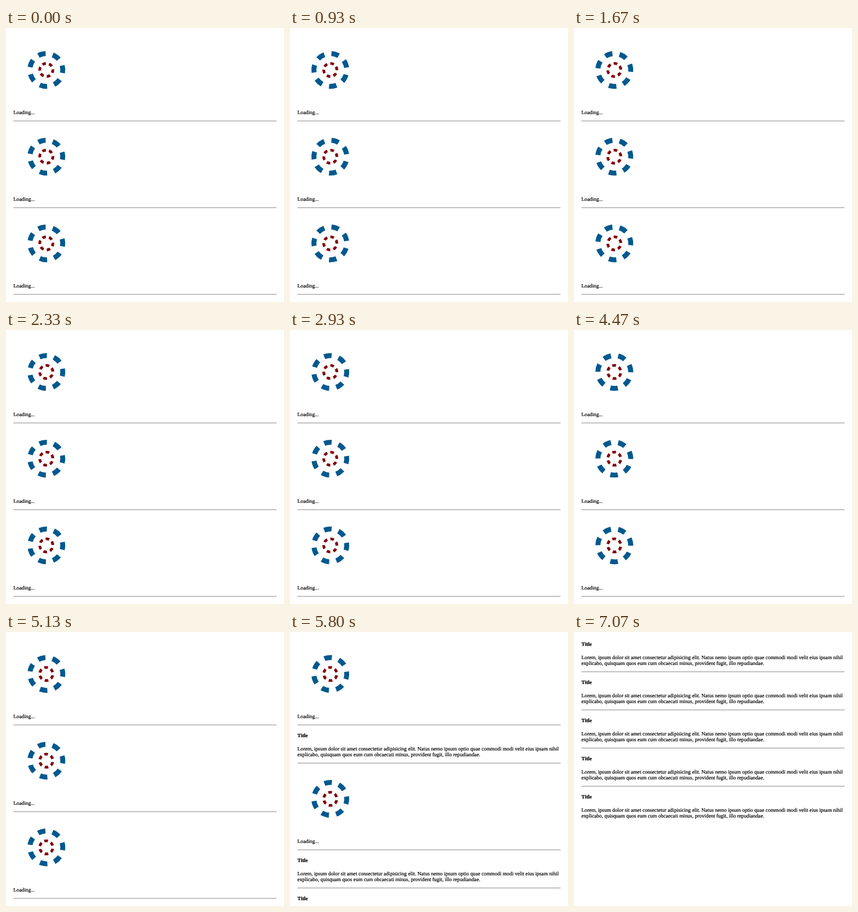
Animation of 480x474 px, one loop 7.19 s. Source, as an HTML page:

```html
<!DOCTYPE html>
<html lang="en">
<head>
<meta charset="utf-8">
<title>Loading list</title>
<style>
  html, body { margin: 0; width: 100%; height: 100%; overflow: hidden; background: #fff; }
  svg { display: block; }
  text {
    font: 9.085px "Liberation Serif", Times, serif;
    text-rendering: geometricPrecision;
    stroke: #000; stroke-width: .2;
  }
  .title { font-weight: bold; }
  circle { fill: none; }
  .outer { stroke: #00588e; stroke-width: 8.6; stroke-dasharray: .51 .49; }
  .inner { stroke: #7f0006; stroke-width: 4.7; stroke-dasharray: .53 .47; }
  .rule { fill: #b0b0b0; }
</style>
</head>
<body>
<svg id="stage" width="480" height="474" viewBox="0 0 480 474"></svg>
<script>
const LOOP = 7190, STEP = 1000 / 15, SPEED = 90;
const LOADER_HEIGHT = 150, CONTENT_HEIGHT = 66;
const loadTimes = [7.06, 5.53, 6.26, 5.53, 5.53]; // seconds, one per list item

const stage = document.getElementById('stage');
const rule = y => `<rect class="rule" x="12.8" y="${y}" width="454.4" height="1.5"/>`;

stage.innerHTML = loadTimes.map((_, i) => `
  <g class="item">
    <g class="loader">
      <g transform="translate(69.6 61.6)">
        <circle class="outer" r="28.4" pathLength="7"/>
        <circle class="inner" r="11.36" pathLength="6"/>
      </g>
      <text x="12.8" y="138">Loading...</text>
      ${rule(149)}
    </g>
    <g class="content">
      <text class="title" x="12.8" y="21.1">Title</text>
      <text x="12.8" y="43.6">Lorem, ipsum dolor sit amet consectetur adipisicing elit. Natus nemo ipsum optio quae commodi modi velit eius ipsam nihil</text>
      <text x="12.8" y="54.1">explicabo, quisquam quos eum cum obcaecati minus, provident fugit, illo repudiandae.</text>
      ${i < loadTimes.length - 1 ? rule(65) : ''}
    </g>
  </g>`).join('');

const all = selector => [...stage.querySelectorAll(selector)];
const items = all('.item'), loaders = all('.loader'), contents = all('.content');
const outers = all('.outer'), inners = all('.inner');
const rotate = (rings, angle) =>
  rings.forEach(ring => ring.setAttribute('transform', `rotate(${angle})`));
const show = (node, visible) => node.setAttribute('display', visible ? 'inline' : 'none');

function draw(now) {
  // The picture advances 15 times a second; times are rounded to 10 ms.
  const t = Math.floor((now % LOOP + 4) / STEP) * STEP / 1000;
  rotate(outers, SPEED * t - 15.7);
  rotate(inners, -SPEED * t - 5.6);

  let y = t >= loadTimes[0] ? 3 : 11;
  items.forEach((item, i) => {
    const loaded = t >= loadTimes[i];
    show(loaders[i], !loaded);
    show(contents[i], loaded);
    item.setAttribute('transform', `translate(0 ${y})`);
    y += loaded ? CONTENT_HEIGHT : LOADER_HEIGHT;
  });
}

const start = performance.now();
function tick() {
  draw(performance.now() - start);
  requestAnimationFrame(tick);
}
tick();
</script>
</body>
</html>
```
